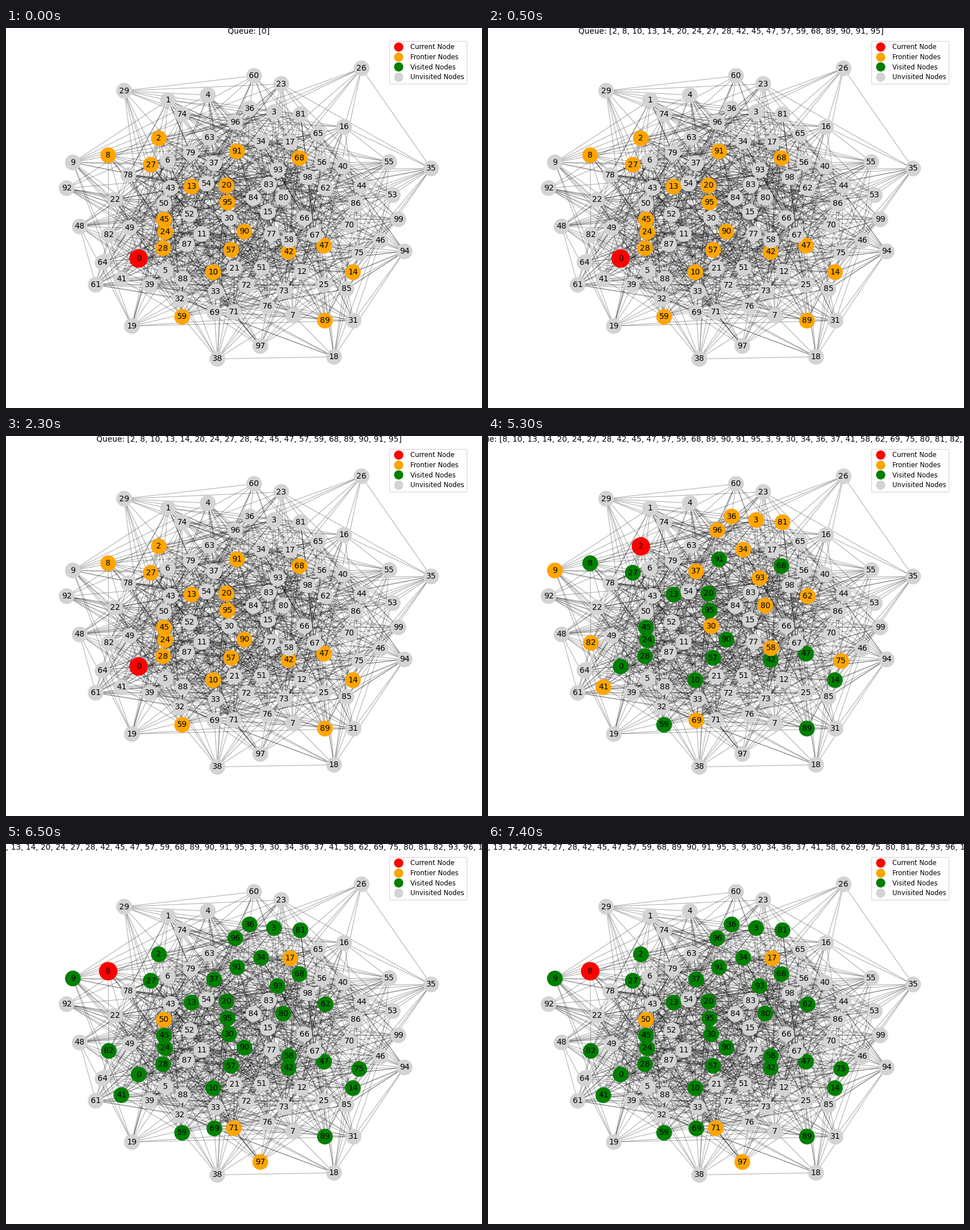
A matplotlib script that plays this animation: 837x669 px, repeating every 8 s.

```python
import itertools
import random

import matplotlib.pyplot as plt
import numpy as np
from matplotlib.animation import FuncAnimation
from matplotlib.collections import LineCollection
from matplotlib.lines import Line2D

WIDTH, HEIGHT = 837, 669
NODES = 100
SEED = 42
LEFT, RIGHT, TOP, BOTTOM = 106.5, 747.5, 71, 582.5
COLORS = {"Current Node": "red", "Frontier Nodes": "orange",
          "Visited Nodes": "green", "Unvisited Nodes": "lightgray"}

plt.rcParams["font.family"] = "DejaVu Sans"


def random_graph(n, p, seed):
    rng = random.Random(seed)
    return [e for e in itertools.combinations(range(n), 2) if rng.random() < p]


def spring_layout(n, edges, seed, iterations=50):
    """Fruchterman-Reingold force-directed node positions."""
    adjacency = np.zeros((n, n))
    for a, b in edges:
        adjacency[a, b] = adjacency[b, a] = 1
    pos = np.random.RandomState(seed).rand(n, 2)
    k = np.sqrt(1 / n)
    step = np.ptp(pos, axis=0).max() * 0.1
    cooling = step / (iterations + 1)
    for _ in range(iterations):
        delta = pos[:, None] - pos[None]
        dist = np.clip(np.linalg.norm(delta, axis=-1), 0.01, None)
        force = np.einsum("ijk,ij->ik", delta,
                          k * k / dist**2 - adjacency * dist / k)
        length = np.linalg.norm(force, axis=-1)
        length = np.where(length < 0.01, 0.1, length)
        pos += force * (step / length)[:, None]
        step -= cooling
    return pos


def fit(values, start, end):
    low, high = values.min(), values.max()
    return start + (values - low) / (high - low) * (end - start)


def bfs_steps(edges, start, count):
    """Return (current, frontier, seen, queue) for each step of the search."""
    neighbours = {n: [] for n in range(NODES)}
    for a, b in edges:
        neighbours[a].append(b)
        neighbours[b].append(a)
    queue, seen, steps = [start], {start}, []
    for _ in range(count):
        before = list(queue)
        current = queue.pop(0)
        frontier = sorted(n for n in neighbours[current] if n not in seen)
        queue += frontier
        seen |= set(frontier)
        if not steps:
            steps.append((current, set(frontier), set(seen), before))
        steps.append((current, set(frontier), set(seen), list(queue)))
    return steps


def node_state(node, current, frontier, seen):
    if node == current:
        return "Current Node"
    if node in frontier:
        return "Frontier Nodes"
    return "Visited Nodes" if node in seen else "Unvisited Nodes"


edges = random_graph(NODES, 0.2, SEED)
steps = bfs_steps(edges, 0, 3)
layout = spring_layout(NODES, edges, SEED)
xs = fit(layout[:, 0], LEFT, RIGHT)
ys = fit(layout[:, 1], BOTTOM, TOP)
points = list(zip(xs, ys))

fig = plt.figure(figsize=(10.009, 8), dpi=HEIGHT / 8, facecolor="white")
ax = fig.add_axes((0, 0, 1, 1))
ax.set_xlim(0, WIDTH)
ax.set_ylim(HEIGHT, 0)
ax.axis("off")

ax.add_collection(LineCollection([(points[a], points[b]) for a, b in edges],
                                 colors="black", linewidths=1, alpha=0.3,
                                 zorder=1), autolim=False)
dots = ax.scatter(xs, ys, s=500, c=["lightgray"] * NODES, linewidths=1.5,
                  zorder=2)
for n, (x, y) in enumerate(points):
    ax.text(x, y, str(n), size=12, ha="center", va="center", zorder=3)
title = ax.text(427, 10, "", size=11.9, ha="center", va="baseline")

handles = [Line2D([0], [0], marker="o", color="w", markerfacecolor=color,
                  markersize=15, label=label)
           for label, color in COLORS.items()]
ax.legend(handles=handles, loc="upper right", fontsize=10, labelspacing=0.39,
          bbox_to_anchor=(816, 17), bbox_transform=ax.transData)


def draw(i):
    # The opening step lasts one tick, each later one six
    current, frontier, seen, queue = steps[(i + 5) // 6]
    states = [node_state(n, current, frontier, seen) for n in range(NODES)]
    dots.set_facecolor([COLORS[s] for s in states])
    dots.set_sizes([700 if s == "Current Node" else 500 for s in states])
    title.set_text(f"Queue: {queue}")
    return dots, title


anim = FuncAnimation(fig, draw, frames=16, init_func=lambda: draw(0),
                     interval=500, repeat=True, repeat_delay=0)
plt.show()
```
